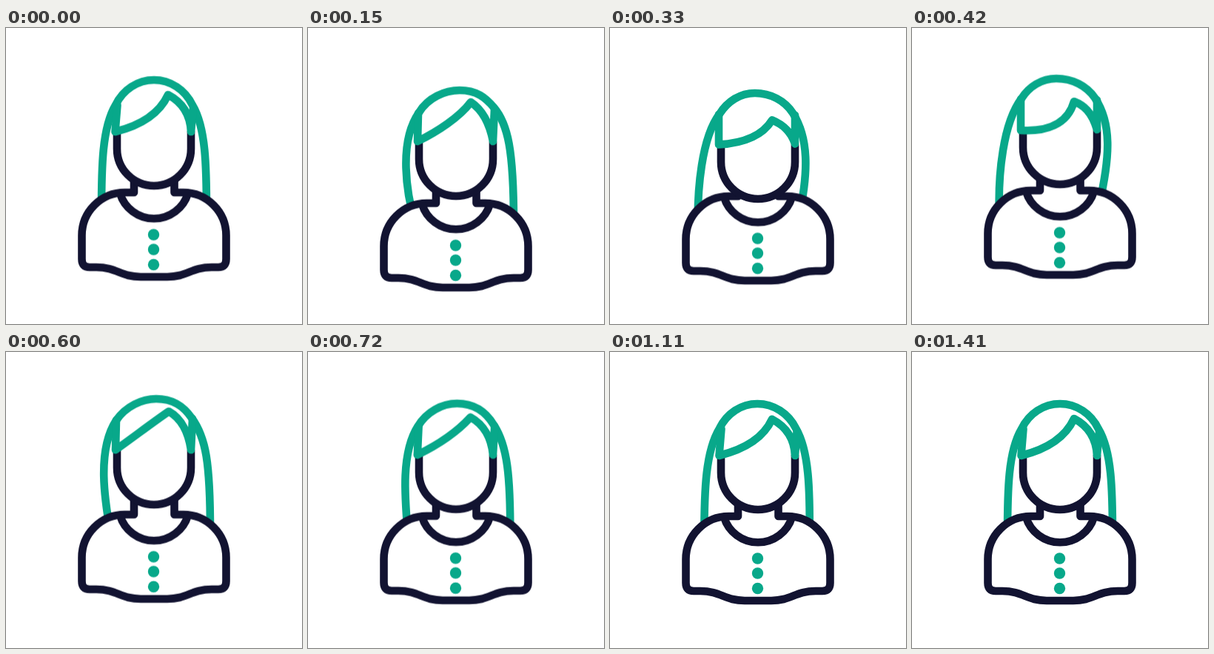
Write an HTML page without scripts that moves like this. It is 400 by 400 pixels and loops after 3.95 s.

```html
<!DOCTYPE html>
<html lang="en">
<head>
<meta charset="utf-8">
<title>Bouncing avatar</title>
<style>
  html, body { margin: 0; width: 100%; height: 100%; overflow: hidden; background: #fff; }
  svg { display: block; width: 100%; height: 100%; }

  .line { fill: none; stroke: #121331; stroke-width: 10.6; stroke-linecap: round; stroke-linejoin: round; }
  .solid { fill: #fff; }
  .green { stroke: #08a88a; }
  .dots { fill: #08a88a; }

  .body, .head, .hair, .fringe { animation: 3950ms infinite ease-in-out; }
  .body { animation-name: body; }
  .head { animation-name: head; }
  .hair { animation-name: hair; }
  .fringe { animation-name: fringe; }

  @keyframes body {
    0% { transform: translateY(0); }
    4.557% { transform: translateY(15.5px); }
    11.9% { transform: translateY(-3.5px); }
    20.25%, 100% { transform: translateY(0); }
  }

  @keyframes head {
    0% { transform: translateY(0); animation-timing-function: cubic-bezier(.4, 0, .7, .65); }
    3.797% { transform: translateY(14px); animation-timing-function: cubic-bezier(.3, .4, .6, 1); }
    6.456% { transform: translateY(24.8px); animation-timing-function: cubic-bezier(.4, 0, .7, .6); }
    10.633% { transform: translateY(-1.5px); animation-timing-function: cubic-bezier(.2, .65, .5, 1); }
    13.29% { transform: translateY(-8px); }
    21.52% { transform: translateY(3.2px); }
    28.1%, 100% { transform: translateY(0); }
  }

  /* Strands swing right, left, right, left, then settle */
  @keyframes hair {
    0%, 35.7%, 100% { d: path("M129,250 C129,186 130,134 148,104 C158,83 178,70 200,70 C222,70 242,83 252,104 C270,134 271,186 271,250"); }
    3.797% { d: path("M145,250 C133,210 122,140 150,100 C162,80 185,70 205,70 C228,70 240,80 251,93 C270,115 278,150 278,250"); }
    6.835% { d: path("M120,250 C120,200 125,130 148,100 C160,81 177,70 197,70 C217,70 236,80 247,98 C266,130 270,175 258,235"); animation-timing-function: ease-out; }
    10.633% { d: path("M118,255 C116,200 123,130 148,97 C158,81 175,70 195,70 C217,70 236,80 247,96 C270,130 268,175 253,240"); }
    15.19% { d: path("M141,250 C134,210 122,140 149,99 C162,80 184,70 203,70 C226,70 240,80 251,96 C270,122 276,155 276,250"); }
    22.025%, 25.06% { d: path("M127,250 C127,186 129,134 148,103 C158,83 177,70 199,70 C221,70 241,83 251,103 C269,134 270,186 269.5,250"); }
  }

  @keyframes fringe {
    0%, 35.7%, 100% { d: path("M150.5,104 L147.5,140 C180,132 207,116 219,90 C238,100 249,116 250,140 L253,108"); }
    3.797% { d: path("M149,101 L148,139 C175,126 205,106 220,86 C238,98 246,118 250,139 L252,95"); }
    6.835% { d: path("M147,100 L147,139 C175,132 198,124 219,114 C232,120 245,127 250,138 L250,101"); animation-timing-function: ease-out; }
    10.633% { d: path("M147,98 L147,140 C180,142 210,133 219,101 C232,106 243,115 250,139 L250,99"); }
    15.19% { d: path("M149,99 L148,139 C172,122 198,102 220,87 C238,97 247,118 250,139 L252,97"); }
    22.025%, 25.06% { d: path("M150.5,104 L147.5,140 C180,132 207,117 219,91 C238,101 249,117 250,140 L252.5,107"); }
  }
</style>
</head>
<body>
<svg viewBox="0 0 400 400">
  <g class="head">
    <path class="hair line green" d="M129,250 C129,186 130,134 148,104 C158,83 178,70 200,70 C222,70 242,83 252,104 C270,134 271,186 271,250"/>
  </g>
  <g class="body">
    <path class="line solid" d="M173,195 V222 H160.5 A58,58 0 0 0 102.5,280 V312 Q102.5,323 113,323 H122 C150,323 155,336 182,336 H218 C245,336 250,323 278,323 H287 Q297.5,323 297.5,312 V280 A58,58 0 0 0 239.5,222 H227.5 V195"/>
    <path class="line" d="M154,223 A48,48 0 0 0 246,223"/>
    <g class="dots">
      <circle cx="199.5" cy="279" r="7.7"/>
      <circle cx="199.5" cy="299" r="7.7"/>
      <circle cx="199.5" cy="319.5" r="7.7"/>
    </g>
  </g>
  <g class="head">
    <path class="line solid" d="M150,140 V163 A50,50 0 0 0 250,163 V140"/>
    <path class="fringe line green" d="M150.5,104 L147.5,140 C180,132 207,116 219,90 C238,100 249,116 250,140 L253,108"/>
  </g>
</svg>
</body>
</html>
```
